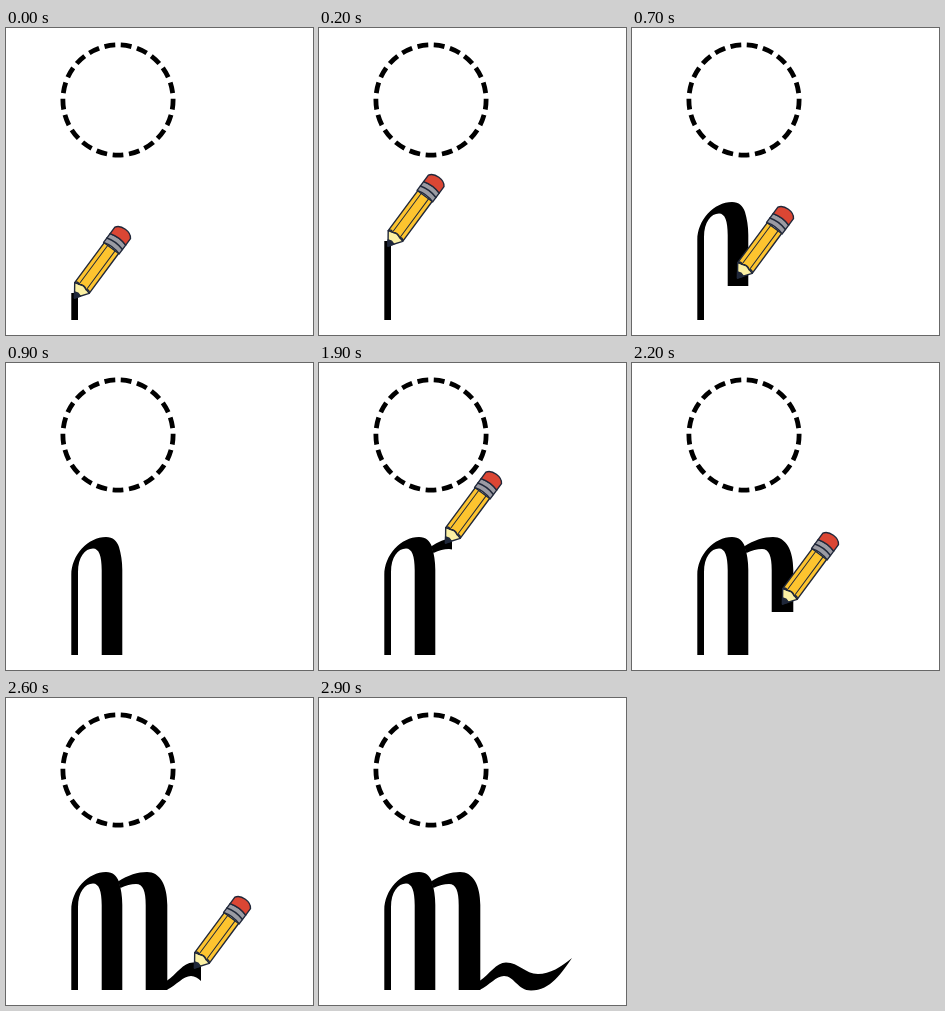
An HTML page that plays this animation: 307x307 px, repeating every 4.9 s.

```html
<!DOCTYPE html>
<html lang="en">
<head>
<meta charset="utf-8">
<title>Writing a letter</title>
<style>
  html, body { margin: 0; width: 100%; height: 100%; overflow: hidden; background: #fff; }
  svg { display: block; width: 100%; height: 100%; }
  #pencil { stroke: #20283a; stroke-width: 1.4; stroke-linejoin: round; stroke-linecap: round; }
</style>
</head>
<body>
<svg viewBox="0 0 307 307">
  <defs>
    <clipPath id="clip0"><path/></clipPath>
    <clipPath id="clip1"><path/></clipPath>
    <clipPath id="clip2"><path/></clipPath>
  </defs>

  <!-- 21 dashes, one centred at the bottom -->
  <circle cx="112" cy="72" r="55.1" fill="none" stroke="#000" stroke-width="4.8" transform="rotate(90 112 72)"
          pathLength="210" stroke-dasharray="6.6 3.4" stroke-dashoffset="3.3"/>

  <path clip-path="url(#clip0)" d="M65.3 292V212C65.3 192 82 174 100 174C107 174 111 178 113 184
    C115 191 116.3 198 116.3 207V292H95.7V207C95.7 193 93 185.5 87 185.5C79 185.5 72 194 72 209V292Z"/>
  <path clip-path="url(#clip1)" d="M112 183.5C122 177 132 174 141 174C154 174 161.3 187 161.3 207V292
    H139.7V207C139.7 193 137 186 130 186C125 186 120 187.5 114.5 190Z"/>
  <path clip-path="url(#clip2)" d="M160.5 283C171 276 177 264.5 187 264.5C200 264.5 206 276 219 276
    C231 276 242 269 253 260C243 274 232 292.5 212 292.5C199 292.5 195 278 185 278C177 278 171 287 160.5 292Z"/>

  <g id="pencil">
    <path fill="#fbf0a4" d="M0 0L12.5 -9L15 0L12.5 9Z"/>
    <path fill="#20283a" d="M0 0L5 -3.6L6 0L5 3.6Z"/>
    <path fill="#fdc42f" d="M12.5 -9H62V9H12.5Q16 7 13.5 4.6Q17 0 13.5 -4.6Q16 -7 12.5 -9Z"/>
    <path fill="none" stroke-width="1" d="M14 -4.6H62M14 4.6H62"/>
    <path fill="#9b9ba3" d="M62 -9.7Q65 0 62 9.7H73Q76 0 73 -9.7Z"/>
    <path fill="none" d="M67.5 -9.7Q70.5 0 67.5 9.7"/>
    <path fill="#db4634" d="M73 -9.7H81Q85.5 -7 85.5 0T81 9.7H73Q76 0 73 -9.7Z"/>
  </g>
</svg>
<script>
  const LOOP = 4900, STEP = 100;

  // Each step: pencil direction and tip position.
  const strokes = [
    { start: 0, steps: [
      ['up', 68.5, 270], ['up', 68.5, 245], ['up', 69, 218], ['up', 73, 193],
      ['across', 86, 178], ['down', 105.5, 201.5], ['down', 105.5, 226.5],
      ['down', 105.5, 250], ['down', 105.5, 275]] },
    { start: 1900, steps: [
      ['across', 126.5, 180], ['across', 143, 181], ['down', 150.5, 214],
      ['down', 150.5, 241], ['down', 150.5, 264], ['down', 150.5, 285]] },
    { start: 2500, steps: [
      ['across', 166, 284], ['across', 188.5, 270], ['across', 213, 282], ['across', 240.5, 262]] }
  ];

  const rect = (top, right, bottom) => `M0 ${top}H${right}V${bottom}H0Z`;
  const reveal = {
    up: (x, y) => rect(y - 5, 90, 307),
    across: (x, y) => rect(0, x + 6.5, y + 30),
    down: (x, y) => rect(0, 307, y + 8)
  };

  const pencil = document.getElementById('pencil');
  const clips = strokes.map((_, i) => document.querySelector(`#clip${i} path`));

  function draw(time) {
    let tip = null;
    strokes.forEach(({ start, steps }, i) => {
      const index = Math.floor((time - start) / STEP);
      const done = index >= steps.length;
      const drawn = steps.slice(0, Math.max(0, index + 1));
      clips[i].setAttribute('d', done
        ? rect(0, 307, 307)
        : drawn.map(([dir, x, y]) => reveal[dir](x, y)).join(''));
      if (index >= 0 && !done) tip = steps[index];
    });
    pencil.style.display = tip ? '' : 'none';
    if (tip) pencil.setAttribute('transform', `translate(${tip[1]} ${tip[2]}) rotate(-53.5)`);
  }

  const origin = performance.now();
  function tick() {
    draw((performance.now() - origin) % LOOP);
    requestAnimationFrame(tick);
  }
  tick();
</script>
</body>
</html>
```
